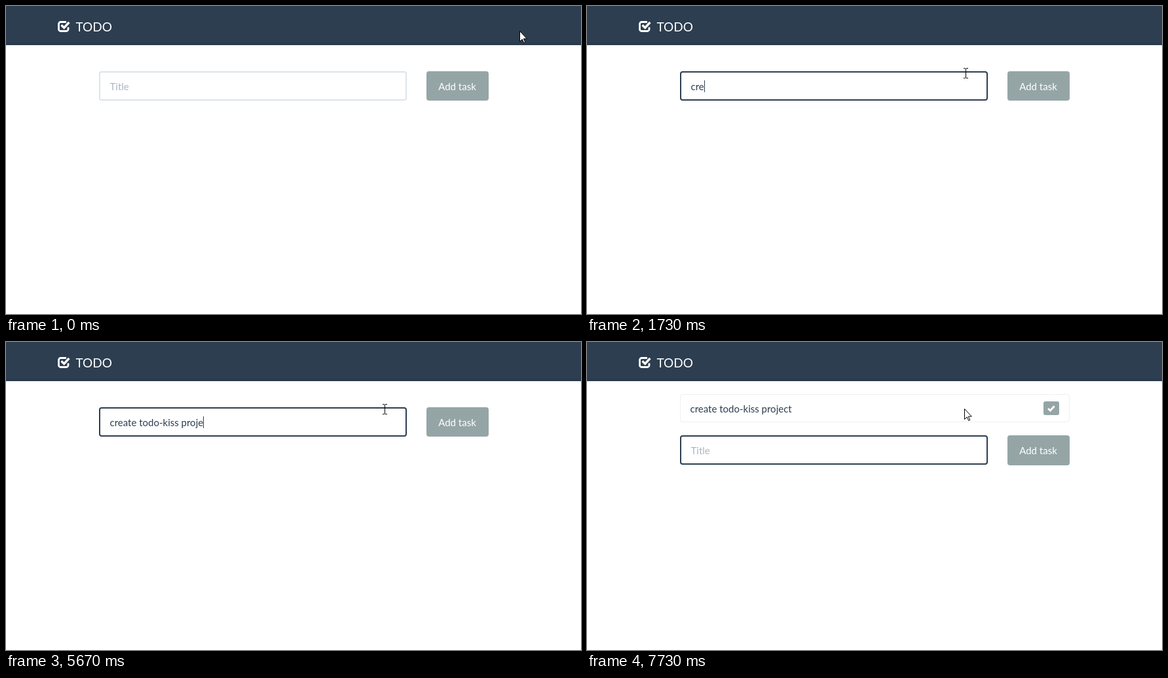
An HTML page for the animation above (8 s loop, 878 by 472 pixels).

```html
<!DOCTYPE html>
<html lang="en">
<head>
<meta charset="utf-8">
<title>Todo</title>
<style>
  html, body { margin: 0; width: 100%; height: 100%; overflow: hidden; background: #fff; }
  body { position: relative; font: 15px/18px Lato, sans-serif; color: #2c3e50; }
  header, div, span, svg { position: absolute; top: 0; left: 0; box-sizing: border-box; white-space: nowrap; }
  header { width: 878px; height: 60px; background: #2c3e50; border-bottom: 4px solid #2b3a4e; }
  #brand { left: 106.5px; top: 20px; font-size: 19px; line-height: 23px; color: #fff; }
  #item { left: 141.5px; top: 80px; width: 595px; height: 43px; border: 1px solid #ecf0f1; border-radius: 4px; }
  #item span { left: 15px; top: 12px; }
  #done { left: 554px; top: 10px; width: 24px; height: 21px; border-radius: 3px; background: #95a5a6; }
  #form { left: 141.5px; width: 595px; }
  #field { width: 470px; height: 45px; border: 2px solid; border-radius: 4px; }
  #field span { left: 15px; top: 12px; white-space: pre; }
  #hint { color: #acb6c0; }
  #field #caret { width: 1px; height: 18px; background: #2c3e50; }
  #add { left: 500px; width: 95px; height: 45.4px; padding-top: 14px; border-radius: 4px;
    background: #95a5a6; color: #fff; text-align: center; }
  #status { top: 451px; width: 264px; height: 21px; padding: 3px 4px; background: #f8f8f8;
    border: solid #dcdcdc; border-width: 1px 1px 0 0; color: #333; font: 11.2px/16px "Open Sans", sans-serif; }
  svg { overflow: visible; fill: none; }
</style>
</head>
<body>
<header></header>
<svg width="100" height="50" stroke="#fff">
  <path d="M92 24.5h-8.5a3 3 0 0 0-3 3v8a3 3 0 0 0 3 3h8.5a3 3 0 0 0 3-3v-3" stroke-width="2.8"/>
  <path d="M84.5 29.2l4.2 4.2 7.6-8.4" stroke-width="3.4"/>
</svg>
<div id="brand">TODO</div>

<div id="item">
  <span>create todo-kiss project</span>
  <div id="done"><svg width="24" height="21" stroke="#fff" stroke-width="2.8"><path d="M7.2 11l3.2 3.2 6.2-7"/></svg></div>
</div>

<div id="form">
  <div id="field"><span id="hint">Title</span><span id="typed"></span><span id="caret"></span></div>
  <div id="add">Add task</div>
</div>

<div id="status">Trasferimento dati da localhost...</div>

<svg id="pointer" width="12" height="19">
  <path id="arrow" d="M.5.5v16l3.7-3.6 2.6 5.6 2-.9-2.5-5.5h5z" fill="#fff" stroke="#000"/>
  <path id="beam" d="M-1-6.5h3m1 0h3M2.5-6v14M-1 8.5h3m1 0h3" stroke="#000"/>
</svg>

<script>
const $ = id => document.getElementById(id);
const LOOP = 8000, FRAME = 1000 / 15;
const FOCUS = 544, SENT = 6930, ADDED = 7200;
const BLINK = 526, KEY_GAP = 130;

// Bursts of typing and the time each one starts
const bursts = { 'cre': 1470, 'ate ': 2000, 'to': 2600, 'do': 3070, '-': 3600, 'k': 3930,
  'is': 4130, 's ': 4400, 'pro': 4730, 'je': 5530, 'ct': 5870 };
const keys = Object.entries(bursts).flatMap(([text, start]) =>
  [...text].map((char, i) => ({ char, time: start + i * KEY_GAP })));

const progress = (t, from, to) => Math.max(0, Math.min(1, (t - from) / (to - from)));
const ease = p => p * p * (3 - 2 * p);
const show = (id, on) => $(id).style.visibility = on ? 'visible' : 'hidden';

function drawForm(t) {
  const added = t >= ADDED;
  const pressed = keys.filter(k => k.time <= t);
  const text = added ? '' : pressed.map(k => k.char).join('');
  $('typed').textContent = text;
  show('hint', !text);
  show('item', added);
  $('form').style.top = (added ? 143.4 : 100) + 'px';

  const focus = progress(t, FOCUS, FOCUS + 120) * 100;
  $('field').style.borderColor = `color-mix(in srgb, #2c3e50 ${focus}%, #dce4ec)`;

  const sinceReset = t - (added ? ADDED : FOCUS);
  const typing = pressed.length && t - pressed.at(-1).time < 2 * KEY_GAP;
  const lit = Math.floor(sinceReset / BLINK) % 2 === 0;
  $('caret').style.left = 15 + $('typed').getBoundingClientRect().width + 'px';
  show('caret', t >= FOCUS && (lit || typing));
}

function drawPointer(t) {
  // Glide into the field, then drift a little to the right
  const a = ease(progress(t, 0, 540)), b = ease(progress(t, 660, 920));
  const x = Math.round(784 - 230 * a + 22 * b), y = Math.round(38 + 76 * a - 12 * b);
  const beam = x < 610 && y >= 100 && t < ADDED;
  $('pointer').style.transform = `translate(${x}px, ${y}px)`;
  show('beam', beam);
  show('arrow', !beam);
}

function tick() {
  const t = performance.now() % LOOP;
  drawForm(t);
  drawPointer(Math.floor((t + 1) / FRAME) * FRAME);
  $('status').style.opacity = t < SENT ? 0 : 1 - progress(t, 7130, 7400);
  requestAnimationFrame(tick);
}
tick();
</script>
</body>
</html>
```
